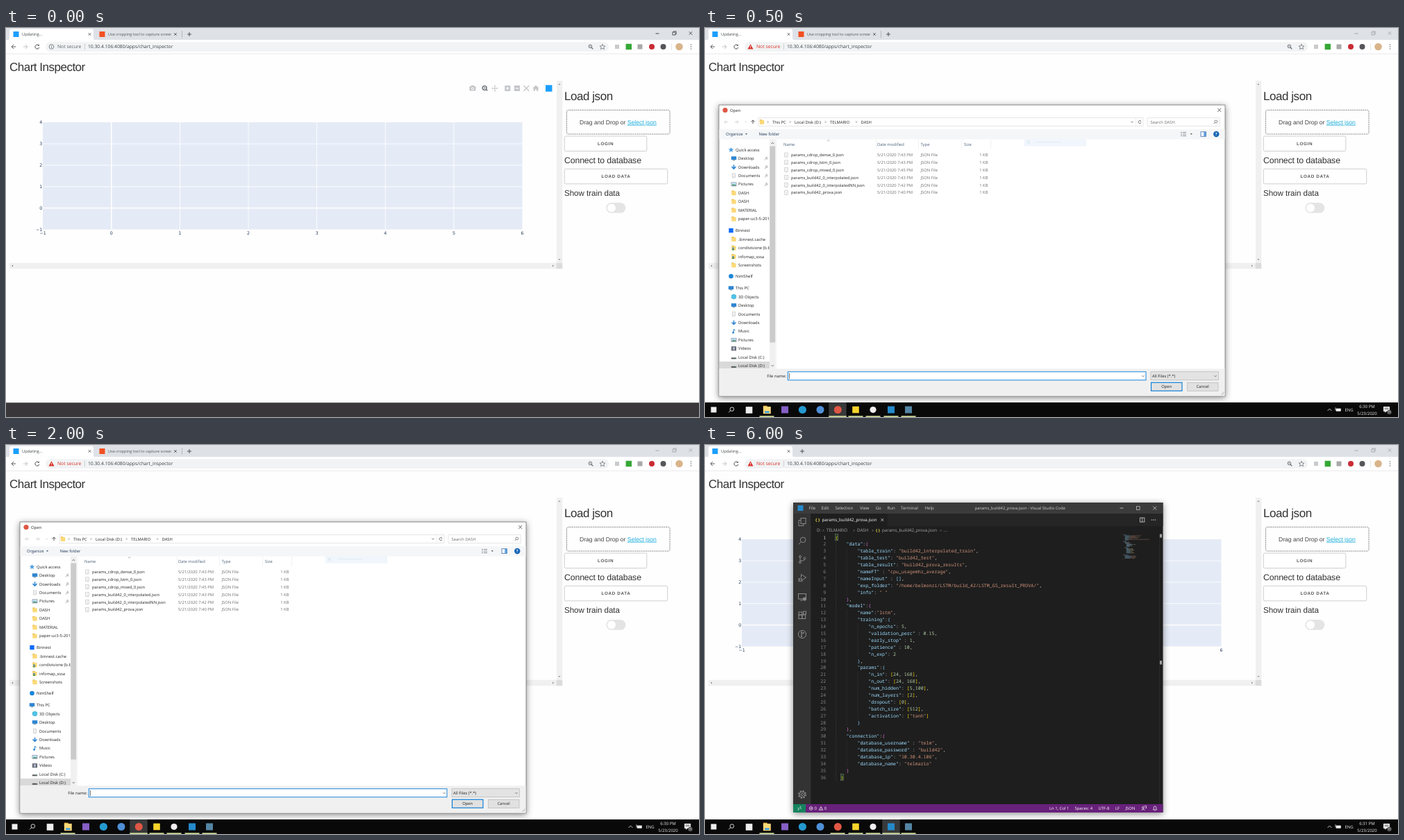
Write an HTML page that moves like this. It is 998 px wide and 561 px high and loops after 8 s.

```html
<!DOCTYPE html>
<html lang="en">
<head>
<meta charset="utf-8">
<title>Chart Inspector</title>
<style>
  html, body { margin: 0; width: 100%; height: 100%; overflow: hidden; background: #fefefe; }
  svg#stage { display: block; width: 100vw; height: 100vh; }
  text { white-space: pre; text-rendering: geometricPrecision; font-family: "Open Sans", "Noto Sans", sans-serif; }
  .page { font-family: "Liberation Sans", Arial, sans-serif; }
  .axis { font-family: "DejaVu Sans", Verdana, sans-serif; }
  .code { font-family: "Noto Sans Mono", "DejaVu Sans Mono", monospace; }
</style>
</head>
<body>
<svg id="stage" viewBox="0 0 998 561" preserveAspectRatio="none"></svg>
<script>
const LOOP = 8000, DIALOG_AT = 500, EDITOR_AT = 3000;

// Drawing helpers; text y is the vertical middle of the capitals.
const rect = (x, y, w, h, fill, extra = '') => `<rect x="${x}" y="${y}" width="${w}" height="${h}" fill="${fill}" ${extra}/>`;
const box = (x, y, w, h, fill, line, r = 0, width = .6) => rect(x, y, w, h, fill, `stroke="${line}" stroke-width="${width}" rx="${r}"`);
const dot = (x, y, r, fill, extra = '') => `<circle cx="${x}" cy="${y}" r="${r}" fill="${fill}" ${extra}/>`;
const ring = (x, y, r, line, width = .8) => dot(x, y, r, 'none', `stroke="${line}" stroke-width="${width}"`);
const square = (x, y, r, fill) => rect(x - r, y - r, 2 * r, 2 * r, fill);
const path = (d, line, width = .8, fill = 'none') => `<path d="${d}" stroke="${line}" stroke-width="${width}" fill="${fill}"/>`;
const text = (x, y, s, size, fill, extra = '') => `<text x="${x}" y="${y + size * .36}" font-size="${size}" fill="${fill}" ${extra}>${s}</text>`;
const middle = 'text-anchor="middle"', end = 'text-anchor="end"';
const clip = (x, y, w, h, body) => `<svg x="${x}" y="${y}" width="${w}" height="${h}" viewBox="${x} ${y} ${w} ${h}">${body}</svg>`;
const at = (x, y, body) => `<g transform="translate(${x} ${y})">${body}</g>`;

// Small icons
const cross = (x, y, r, c, w = .8) => path(`M${x - r} ${y - r}l${2 * r} ${2 * r}m0 ${-2 * r}l${-2 * r} ${2 * r}`, c, w);
const plus = (x, y, r, c, w = .9) => path(`M${x - r} ${y}h${2 * r}M${x} ${y - r}v${2 * r}`, c, w);
const chevron = (x, y, c, r = 1.3) => path(`M${x - r / 2} ${y - r}l${r} ${r}l${-r} ${r}`, c, .6);
const caretDown = (x, y, c, r = 1.6) => path(`M${x - r} ${y - r / 2}l${r} ${r}l${r} ${-r}`, c, .7);
const triangle = (x, y, angle, c, r = 1.6) => `<path transform="translate(${x} ${y}) rotate(${angle})" d="M${-r} ${r / 2}L0 ${-r / 2}L${r} ${r / 2}z" fill="${c}"/>`;
const arrow = (x, y, angle, c, w = .9, r = 3) => `<g transform="translate(${x} ${y}) rotate(${angle})">${path(`M${r} 0H${-r}M0 ${-r}L${-r} 0L0 ${r}`, c, w)}</g>`;
const glass = (x, y, c, w = .9, r = 2.3) => ring(x - .6, y - .6, r, c, w) + path(`M${x + 1} ${y + 1}l2.4 2.4`, c, w + .2);
const mirrorGlass = (x, y, c, r, w) => ring(x + r * .3, y - r * .3, r, c, w) + path(`M${x - r * .4} ${y + r * .4}l${-r} ${r}`, c, w);
const reload = (x, y, r, c, w) => path(`M${x + r * .8} ${y - r * .6}A${r} ${r} 0 1 0 ${x + r} ${y + r * .3}`, c, w) + triangle(x + r * .8, y - r * .6, 135, c, r * .5);
const folder = (x, y, s = 1) => rect(x - 3.2 * s, y - 3.4 * s, 3.4 * s, 3 * s, '#e3b341') + rect(x - 3.2 * s, y - 2.6 * s, 6.4 * s, 6 * s, '#fbd978');
const paper = (x, y) => box(x - 2.2, y - 3, 4.4, 6, '#fff', '#aaa', 0, .5) + path(`M${x - 1.2} ${y - 1}h2.4m-2.4 1.4h2.4m-2.4 1.4h2.4`, '#bbb', .4);

function tabStrip(hasSecondTab) {
  const plusX = hasSecondTab ? 264 : 140;
  const second = square(138.5, 9, 4, '#f25022') +
    clip(146, 3, 92, 13, text(147, 9, 'Use cropping tool to capture screens', 5.6, '#555b61')) +
    cross(244, 9, 1.8, '#444') + rect(253, 4, .6, 10, '#9a9da1');
  return (hasSecondTab ? second : '') + plus(plusX, 9, 3, '#444');
}
const windowControls = c => path('M935.5 8h5', c) + box(960, 6, 4, 4, 'none', c, 0, .7) +
  path('M961.3 6V4.8h4v4H964', c, .6) + cross(986, 7.5, 2.3, c, .7);
const safeNotice = ring(65.5, 27, 3.3, '#5f6368') + path('M65.5 26.5v2.2M65.5 25v.8', '#5f6368') + text(74, 27, 'Not secure', 6.8, '#5f6368');
const warnNotice = '<path d="M65.5 23.2L69.5 30.4H61.5z" fill="#d93025"/>' + path('M65.5 25.7v2.3m0 .6v.8', '#fff') + text(74, 27, 'Not secure', 6.8, '#d93025');

function browser() {
  let s = rect(0, 0, 998, 17.5, '#dee1e6') + '<path d="M2 17.5Q5 17.5 5 14V5Q5 1.5 8 1.5H123Q126 1.5 126 5V14Q126 17.5 129 17.5z" fill="#fff"/>';
  s += rect(0, 17.3, 998, 19.7, '#fff') + rect(0, 36.8, 998, .7, '#dfe1e4');
  s += square(14.5, 9, 4, '#1a9fff') + text(23, 9, 'Updating...', 5.8, '#45494d') + cross(120.5, 9, 1.8, '#444');
  s += arrow(11, 27, 0, '#44474a') + arrow(28, 27, 180, '#b8babd') + reload(44.8, 27, 3, '#44474a', 1);
  s += rect(57, 20.3, 811, 13.6, '#f1f3f4', 'rx="6.8"') + rect(113, 22.5, .6, 9, '#b5b8bb');
  s += text(118, 27, '10.30.4.106:4080/apps/chart_inspector', 6.75, '#3c4043');
  s += glass(842, 27, '#5f6368') + plus(841.4, 26.4, 1, '#5f6368', .5);
  s += path('M859 23.3l1.1 2.6 2.8.2-2.1 1.8.7 2.8-2.5-1.5-2.5 1.5.7-2.8-2.1-1.8 2.8-.2z', '#5f6368', .7);
  s += square(880, 27, 3, '#c9cacc') + square(896.8, 27, 4.2, '#35a836') + square(913, 27, 3.5, '#a9a9a9');
  s += dot(930, 27, 4, '#c92c35') + dot(946.5, 27, 4, '#55565a') + rect(958, 22, .6, 10, '#d5d7da') + dot(969.5, 27, 5.3, '#d9b48b');
  return s + [24, 27, 30].map(y => dot(986.5, y, .75, '#5f6368')).join('');
}

function dashboard() {
  const dark = '#333', cls = 'class="page"', track = '#f0f0f0', tip = '#777';
  const heading = (x, y, s, size, spacing) => text(x, y, s, size, dark, `${cls} letter-spacing="${spacing}"`);
  let s = heading(5, 56.3, 'Chart Inspector', 17, -.5);
  s += rect(53, 136, 690.5, 154.5, '#e5ebf6');
  for (let i = 0; i < 6; i++) s += rect(151.8 + i * 98.62 - (i ? .4 : .7), 136, i ? .8 : 1.4, 154.5, '#fff');
  for (let i = 0; i < 4; i++) s += rect(53, 259.6 - i * 30.85 - (i ? .4 : .7), 690.5, i ? .8 : 1.4, '#fff');
  const label = v => String(v).replace('-', '−');
  for (let v = -1; v <= 6; v++) s += text(151.8 + v * 98.62, 295.3, label(v), 6.3, '#2a3f5f', `class="axis" ${middle}`);
  for (let v = -1; v <= 4; v++) s += text(52.2, 259.6 - v * 30.85, label(v), 6.3, '#2a3f5f', `class="axis" ${end}`);

  s += rect(793, 76, 8.3, 262.5, track) + rect(5, 338.7, 787.5, 8.6, track) + rect(792.5, 338.7, 8.8, 8.6, '#dcdcdc');
  s += triangle(797, 81, 0, tip) + triangle(797, 334, 180, tip) + triangle(9.2, 343, -90, tip) + triangle(788, 343, 90, tip);

  s += heading(804, 98, 'Load json', 17, -.45);
  s += rect(807.5, 118.3, 148.5, 34.7, 'none', 'rx="2.5" stroke="#555" stroke-width=".8" stroke-dasharray="1.6 1.1"');
  s += text(826, 135.6, 'Drag and Drop or <tspan fill="#1eaedb" text-decoration="underline">Select json</tspan>', 8.6, '#444', cls);
  const button = (y, w, s) => box(804.3, y, w, 21.6, '#fff', '#bbb', 2, .7) +
    text(804.3 + w / 2, y + 10.8, s, 6.3, '#555', `${cls} font-weight="bold" letter-spacing=".65" ${middle}`);
  s += button(156, 118.5, 'LOGIN') + button(203.2, 148.4, 'LOAD DATA');
  s += heading(804, 190.5, 'Connect to database', 12.3, -.14) + heading(804, 238.3, 'Show train data', 11.6, -.04);
  return s + rect(864.3, 252, 28, 14.8, '#e4e4e4', 'rx="7.4"') + dot(872, 259.4, 6, '#fff');
}

function modebar() {
  const c = '#c3c5c9', y = 87;
  return rect(667.5, 84, 9, 6.5, c, 'rx="1"') + rect(670, 82.8, 4, 2, c) + dot(672, y + .2, 2, '#fff') + dot(672, y + .2, 1.1, c) +
    glass(689.8, y, '#777b82', 1.5, 3) + plus(689.2, y - .6, 1.5, '#777b82', .8) +
    plus(704, y, 4.2, c, 1) + [0, 90, 180, 270].map(a => at(704, y, `<g transform="rotate(${a})">${triangle(0, -3.7, 0, c, 1.5)}</g>`)).join('') +
    square(722.3, y, 4, c) + plus(722.3, y, 2.3, '#fff', 1.2) +
    square(736, y, 4, c) + path(`M733.7 ${y}h4.6`, '#fff', 1.2) +
    cross(749.4, y, 4, c, 1.2) + `<path d="M763 82.6L767.6 87H766.4V90.7H764V88.3H762V90.7H759.7V87H758.5z" fill="${c}"/>` +
    square(781.8, y, 4.7, '#1a9fff');
}

function taskbar(time, activeX) {
  const white = '#eee';
  let s = rect(0, 540, 998, 21, '#090909') + rect(activeX - 12.7, 540, 25.4, 21, '#38393a');
  s += square(12.5, 550.5, 4, white) + mirrorGlass(38, 550.5, white, 2.8, .9);
  s += square(63.5, 551, 4.8, white) + folder(89.3, 550.5, 1.7) + rect(86, 552.5, 6.6, 2.6, '#3c9edb');
  s += square(115, 550.5, 5, '#865fc5') + dot(140.4, 550.5, 5.6, '#2499cf') + dot(166, 550.5, 5.5, '#4f8fd6');
  s += dot(191.3, 550.5, 5.5, '#df5745') + square(217, 550.5, 4.8, '#f8d42b') + dot(242, 550.5, 4.6, '#f3eeee');
  s += square(268, 550.5, 5, '#2489ca') + square(293, 550.5, 5, '#5485a4');
  for (const x of [89, 191, 217, 242, 268, 293]) s += rect(x - (x === activeX ? 12.7 : 10.5), 559.4, x === activeX ? 25.4 : 21, 1.6, '#d5e49a');
  s += path('M896.5 552l3-3 3 3', white) + box(909, 549, 6.5, 3.5, white, white) + path('M908 547.3v4', white);
  s += text(921.5, 550.8, 'ENG', 6, white) + text(953.5, 546.2, time, 6, white, middle) + text(953.5, 555.4, '5/23/2020', 6, white, middle);
  return s + '<path d="M977 546h9v7h-5l-2 2v-2h-2z" fill="#eee"/>' + path('M978.5 548h6m-6 1.6h6', '#111', .5) + dot(985.5, 554, 3.3, '#555') + text(985.5, 554, '11', 4, '#fff', middle);
}

function sidebar() {
  const blue = '#2e86d1';
  const icons = {
    star: (x, y) => path(`M${x} ${y - 3}l.9 2.2 2.3.1-1.8 1.5.6 2.3-2-1.3-2 1.3.6-2.3-1.8-1.5 2.3-.1z`, blue, .4, '#4aa0e6'),
    screen: (x, y) => rect(x - 3.7, y - 2.8, 7.4, 4.8, blue) + rect(x - 1.8, y + 2.5, 3.6, .8, '#567'),
    down: (x, y) => path(`M${x} ${y - 3.2}v5M${x - 3} ${y - .4}l3 3 3-3`, blue, 1.6),
    paper: (x, y) => paper(x, y),
    picture: (x, y) => box(x - 3.6, y - 2.6, 7.2, 5.2, '#bfe0f5', '#889') + path(`M${x - 3} ${y + 2}l2-2.4 1.6 1.4 1.4-1 1.4 2z`, 'none', 0, '#4b8b63'),
    folder: (x, y) => folder(x, y),
    shared: (x, y) => folder(x, y) + dot(x - 1, y + .5, 1.2, '#3b7fae') + rect(x - 2.6, y + 1.8, 3.2, 1.7, '#4a8a4a'),
    square: (x, y) => square(x, y, 3.2, '#0d6bfa'),
    dot: (x, y) => dot(x, y, 3.3, '#1a86d8'),
    cube: (x, y) => path(`M${x} ${y - 3.4}l3.2 1.4v4l-3.2 1.6-3.2-1.6v-4z`, '#1890b8', .5, '#4fc5e8'),
    note: (x, y) => path(`M${x} ${y + 2}v-5l2.2 1.8`, blue, 1) + dot(x - 1, y + 2, 1.4, blue),
    film: (x, y) => rect(x - 3.4, y - 3, 6.8, 6, '#4a4d55') + rect(x - 1.9, y - 2.2, 3.8, 4.4, '#a7b2c4'),
    drive: (x, y) => rect(x - 3.6, y + .6, 7.2, 2, '#555') + rect(x + 1.6, y + 1.2, 1.2, .7, '#4ec96b')
  };
  const groups = [
    [175.5, 'star Quick access|screen Desktop|down Downloads|paper Documents|picture Pictures|folder DASH|folder DASH|folder MATERIAL|folder paper-uc3-5-2019'],
    [292, 'square Binnest|folder .binnest.cache|shared condivisione (b.b|shared infomap_sssa|folder Screenshots'],
    [358, 'dot NimShelf'],
    [375, 'screen This PC|cube 3D Objects|screen Desktop|paper Documents|down Downloads|note Music|picture Pictures|film Videos|drive Local Disk (C:)|drive Local Disk (D:)']
  ];
  let s = rect(21, 481, 72, 10.5, '#d9d9d9');
  for (const [top, list] of groups) list.split('|').forEach((entry, i) => {
    const [, icon, name] = entry.match(/(\w+) (.*)/), y = top + i * 12.47, x = i ? 41.5 : 37.5;
    s += icons[icon](x, y) + text(x + 6.5, y, name, 5.85, '#222');
    if (top < 200 && i > 0 && i < 5) s += path(`M86 ${y + 2.5}l2-2m-1-1.5l2.5 2.5m-1.5-3.5l2.5 2.5m-2-2l1-1`, '#888', .8);
  });
  return clip(21, 161, 72, 330.5, s);
}

function fileDialog() {
  const ink = '#222', grey = '#6d6d6d', size = 5.85;
  let s = rect(20, 111, 729, 420, '#fff', 'stroke="#777" stroke-width=".8" style="filter:drop-shadow(0 2px 5px #0007)"');
  s += dot(29, 118.5, 3.6, '#df5745') + text(36, 118.7, 'Open', size, ink) + cross(740.7, 118.4, 2.5, '#222', .7);
  s += arrow(30.5, 135.5, 0, '#ccc', .8, 2.6) + arrow(45.5, 135.5, 180, '#ccc', .8, 2.6) + caretDown(58.5, 135.5, '#bbb', 1.1) + arrow(69, 135.5, 90, '#444', .9, 2.6);
  s += box(77, 129.7, 554, 11.6, '#fff', '#d5d5d5') + folder(82, 135.5);
  for (const [x, name] of [[97, 'This PC'], [129, 'Local Disk (D:)'], [180, 'TELMARIO'], [224.5, 'DASH']])
    s += chevron(x - 6.5, 135.5, '#444') + text(x, 135.6, name, size, ink);
  s += caretDown(615, 135.5, '#444') + rect(620, 130, .5, 11, '#ddd') + reload(626, 135.5, 2, '#444', .7);
  s += box(637, 129.7, 104.5, 11.6, '#fff', '#d5d5d5') + text(641.5, 135.6, 'Search DASH', size, grey) + mirrorGlass(735.3, 135.5, '#555', 1.9, .7);

  s += rect(20.5, 146, 728, 14.5, '#f5f6f7') + text(30, 153, 'Organize', size, '#1e395b') + triangle(59.5, 153, 180, '#1e395b', 1.7) + text(77.5, 153, 'New folder', size, '#1e395b');
  s += path('M685 150.5h2m1 0h5M685 153h2m1 0h5M685 155.5h2m1 0h5', '#7d8590', .9) + triangle(700.3, 153, 180, '#333', 1.7);
  s += box(714, 149.7, 7.4, 6.6, '#fff', '#4b79b0', 0, .9) + rect(718.3, 150, 3, 6, '#5c9fe0') + dot(736.3, 153, 4.2, '#1464b4') + text(736.3, 153, '?', 6, '#fff', `${middle} font-weight="bold"`);
  s += rect(460, 160, 89, 10.5, '#f0f6fb') + rect(477, 164, 36, .8, '#dfe9f2') + square(466, 164.8, 2, '#e3edf5');

  s += sidebar() + rect(93, 161, 8.5, 330.5, '#f0f0f0') + rect(93.3, 170.5, 7.9, 283, '#cbcbcb');
  s += path('M95.5 167l1.8-1.8 1.8 1.8', '#444') + caretDown(97.3, 487, '#444', 1.8) + rect(102.4, 161, .5, 330.5, '#e6e6e6');
  for (const [x, name] of [[113, 'Name'], [248, 'Date modified'], [310.5, 'Type'], [373, 'Size']]) s += text(x, 168, name, size, '#4c607a');
  for (const x of [246, 307.5, 369.5, 411.5]) s += rect(x, 161, .5, 13.5, '#e2e2e2');
  s += path('M176 163l1.8-1.6 1.8 1.6', '#777', .6);
  const files = [['cdrop_dense_0', 43], ['cdrop_lstm_0', 43], ['cdrop_mixed_0', 45], ['build42_0_interpolated', 43], ['build42_0_interpolatedNN', 42], ['build42_prova', 40]];
  files.forEach(([name, minute], i) => {
    const y = 183 + i * 10.87;
    s += paper(117, y) + text(124, y, `params_${name}.json`, 5.75, ink) + text(248, y, `5/21/2020 7:${minute} PM`, size, grey) +
      text(310.5, y, 'JSON File', size, grey) + text(407.5, y, '1 KB', size, grey, end);
  });

  s += rect(20.5, 491.5, 728, 39, '#f0f0f0') + text(117, 501.8, 'File name:', size, ink, end);
  s += box(119.3, 495.8, 515.7, 12, '#fff', '#0078d7', 0, .9) + rect(121.3, 498, .6, 8, '#111') + caretDown(631, 502, '#444');
  s += box(642, 495.8, 97.5, 12, '#e3e3e3', '#adadad') + text(644, 501.8, 'All Files (*.*)', size, ink) + caretDown(735, 502, '#444');
  s += box(642.5, 511.3, 44.5, 12, '#e1e1e1', '#0078d7', 0, 1.1) + text(664.7, 517.3, 'Open', size, ink, middle);
  s += box(694.5, 511.3, 44.5, 12, '#e1e1e1', '#adadad') + text(716.7, 517.3, 'Cancel', size, ink, middle);
  return s + path('M743 529l4.5-4.5m-2.5 4.5l2.5-2.5', '#aaa', .7);
}

const CODE = `{
    "data":{
        "table_train": "build42_interpolated_train",
        "table_test": "build42_test",
        "table_result": "build42_prova_results",
        "nameFT" : "cpu_usagemhz_average",
        "nameInput" : [],
        "exp_folder": "/home/belmonzi/LSTM/build_42/LSTM_GS_result_PROVA/",
        "info": " "
    },
    "model":{
        "name":"lstm",
        "training":{
            "n_epochs": 5,
            "validation_perc" : 0.15,
            "early_stop" : 1,
            "patience" : 10,
            "n_exp": 2
        },
        "params":{
            "n_in": [24, 168],
            "n_out": [24, 168],
            "num_hidden": [5,100],
            "num_layers": [2],
            "dropout": [0],
            "batch_size": [512],
            "activation": ["tanh"]
        }
    },
    "connection":{
        "database_username" : "telm",
        "database_password" : "build42",
        "database_ip": "10.30.4.106",
        "database_name": "telmario"
    }
  }`;

function codeLines() {
  const brackets = ['#ffd700', '#da70d6', '#87cefa'], size = 6.617, advance = 3.97;
  let depth = 0, s = '';
  CODE.split('\n').forEach((line, row) => {
    const y = 133.2 + row * 9.886;
    let spans = '';
    for (const m of line.matchAll(/"[^"]*"(?=\s*:)|"[^"]*"|[\d.]+|[{[]|[}\]]|\s+|./g)) {
      const token = m[0];
      let color = '#d4d4d4';
      if (/^"/.test(token)) color = /^\s*:/.test(line.slice(m.index + token.length)) ? '#9cdcfe' : '#ce9178';
      else if (/^\d/.test(token)) color = '#b5cea8';
      else if (/[{[]/.test(token)) color = brackets[depth++ % 3];
      else if (/[}\]]/.test(token)) color = brackets[--depth % 3];
      spans += `<tspan fill="${color}">${token}</tspan>`;
      if (token.trim()) s += rect(600.5 + m.index * .52, 128.5 + row * 1.04, token.length * .52, .65, color, 'opacity=".5"');
    }
    const indent = line.search(/\S/);
    for (let col = 0; col < indent; col += 4) s += rect(188 + col * advance, y - 4.94, .4, 9.9, '#3c3c3c');
    if (row === 0 || row === 35) s += box(187.6 + indent * advance, y - 4.6, 4, 9.2, '#1f3a24', '#888', 0, .5);
    s += text(174.2, y, row + 1, size, row ? '#858585' : '#c6c6c6', `class="code" ${end}`) + text(187.7, y, spans, size, '#d4d4d4', 'class="code"');
  });
  return s;
}

function activityIcons() {
  const c = '#8a8a8a', w = 1;
  const icons = [
    box(-2, -5.5, 7, 8, 'none', c, 0, w) + path('M-2 -2.5h-3v8h7v-3', c, w),
    mirrorGlass(0, 0, c, 3.8, w),
    ring(-3, -4, 1.5, c, w) + ring(-3, 4, 1.5, c, w) + ring(3.4, -1.5, 1.5, c, w) + path('M-3 -2.5v5M3.4 0q0 2-6.4 2', c, w),
    path('M-1.5 -1v-4.5l7 4.5-5 3.5', c, w) + ring(-2.5, 2.4, 2.3, c, w) + path('M-6 0l2 1M-6 5l2-1M-6 2.5h7M1 5l-2-1', c, .7),
    box(-5.5, -4.5, 11, 7.5, 'none', c, 0, w) + path('M-3 5h4', c, w) + dot(3.5, 3, 2.6, c),
    box(-5, -1, 4.8, 5.5, 'none', c, 0, w) + box(-.2, -1, 4.8, 5.5, 'none', c, 0, w) + box(-5, -5, 4.8, 4, 'none', c, 0, w) + box(1.5, -6, 4, 4, 'none', c, 0, w),
    ring(0, 0, 5.6, c, w) + path('M-1 -3.5v7M-1 0l3-2', c, w) + dot(-1, -3, 1.1, c) + dot(-1, 3, 1.1, c) + dot(2, -2, 1.1, c)
  ];
  const gear = ring(0, 0, 1.7, c, w) + ring(0, 0, 4, c, w) + dot(0, 0, 5.2, 'none', `stroke="${c}" stroke-width="1.6" stroke-dasharray="2.04 2.04"`);
  return icons.map((icon, i) => at(140, 111 + i * 27, icon)).join('') + at(140, 504, gear);
}

function editor() {
  const light = '#cfcfcf', pale = '#a9a9a9', file = 'params_build42_prova.json';
  let s = rect(127, 83, 532.5, 447, '#1e1e1e', 'style="filter:drop-shadow(0 2px 5px #0007)"');
  s += rect(127, 83, 532.5, 16, '#3b3b3c') + square(137.5, 91, 4, '#2489ca');
  for (const [x, name] of [[149.5, 'File'], [167.5, 'Edit'], [187.5, 'Selection'], [223, 'View'], [245.7, 'Go'], [262.5, 'Run'], [282, 'Terminal'], [316.5, 'Help']])
    s += text(x, 91, name, 6.1, light);
  s += text(453.7, 91, `${file} - Visual Studio Code`, 5.85, light, middle);
  s += path('M597.5 91h5', light) + box(621.5, 88.7, 4.6, 4.6, 'none', light, 0, .7) + cross(647.7, 91, 2.5, light, .8);
  s += rect(127, 99, 25.5, 419, '#333') + activityIcons();
  s += rect(152.5, 99, 507, 18, '#252526') + rect(152.5, 99, 110, 18, '#1e1e1e');
  s += text(159, 107.5, '{ }', 6, '#e8d44d', 'font-weight="bold"') + text(168.5, 108, file, 6.2, '#fff') + cross(255.3, 108, 1.9, '#ddd');
  s += box(626.5, 105, 6.4, 6, 'none', light, 0, .8) + path('M629.7 105v6', light) + [643.5, 646, 648.5].map(x => dot(x, 108, .7, light)).join('');
  for (const [x, name] of [[161, 'D:'], [175, 'TELMARIO'], [219, 'DASH'], [255, file], [344, '...']])
    s += text(x, 123.2, name, 6.2, pale) + (x > 161 ? chevron(x === 255 ? 241.5 : x - 4.5, 123.3, pale) : '');
  s += text(246, 122.9, '{ }', 5.6, '#e8d44d', 'font-weight="bold"') + codeLines();
  s += rect(654, 128, .4, 390, '#3a3a3a') + rect(655, 128.5, 3, 5, '#a0a0a0') + rect(655, 311, 3, 5.5, '#a0a0a0');

  s += rect(127, 518, 532.5, 12, '#68217a') + rect(127, 518, 18, 12, '#16825d') + path('M133.5 523l2 2-2 2m5-6l-2 2 2 2', '#fff', .8);
  s += ring(152.7, 524, 2.4, '#fff', .7) + cross(152.7, 524, 1, '#fff', .6) + text(157.5, 524, '0', 6, '#fff');
  s += path('M167 521.5l2.7 4.8h-5.4z', '#fff', .7) + path('M167 523.2v1.4m0 .4v.6', '#fff', .5) + text(171.8, 524, '0', 6, '#fff');
  for (const [x, name] of [[496, 'Ln 1, Col 1'], [532.5, 'Spaces: 4'], [566.5, 'UTF-8'], [591, 'LF'], [605.5, 'JSON']]) s += text(x, 524, name, 5.9, '#fff');
  s += ring(631, 523, 1.4, '#fff', .7) + path('M628.5 527q2.5-3.5 5 0M632.5 520.7h3v3h-1.5', '#fff', .7);
  return s + path('M645.3 526h5.4l-.9-1.5v-1.7q0-1.8-1.8-1.8t-1.8 1.8v1.7zM647.3 527h1.4', '#fff', .7);
}

const scenes = [
  tabStrip(true) + windowControls('#222') + safeNotice + modebar() + rect(0, 540.3, 998, 20.7, '#39373a'),
  tabStrip(true) + windowControls('#999') + warnNotice + taskbar('6:30 PM', 191) + fileDialog(),
  tabStrip(false) + windowControls('#999') + warnNotice + taskbar('6:31 PM', 268) + editor()
];
const stage = document.getElementById('stage');
stage.innerHTML = rect(0, 0, 998, 561, '#fefefe') + browser() + dashboard() + scenes.map(s => `<g class="scene">${s}</g>`).join('');
const layers = [...stage.querySelectorAll('.scene')];

function render() {
  const time = performance.now() % LOOP;
  const current = time < DIALOG_AT ? 0 : time < EDITOR_AT ? 1 : 2;
  layers.forEach((layer, i) => layer.style.display = i === current ? '' : 'none');
  requestAnimationFrame(render);
}
render();
</script>
</body>
</html>
```
